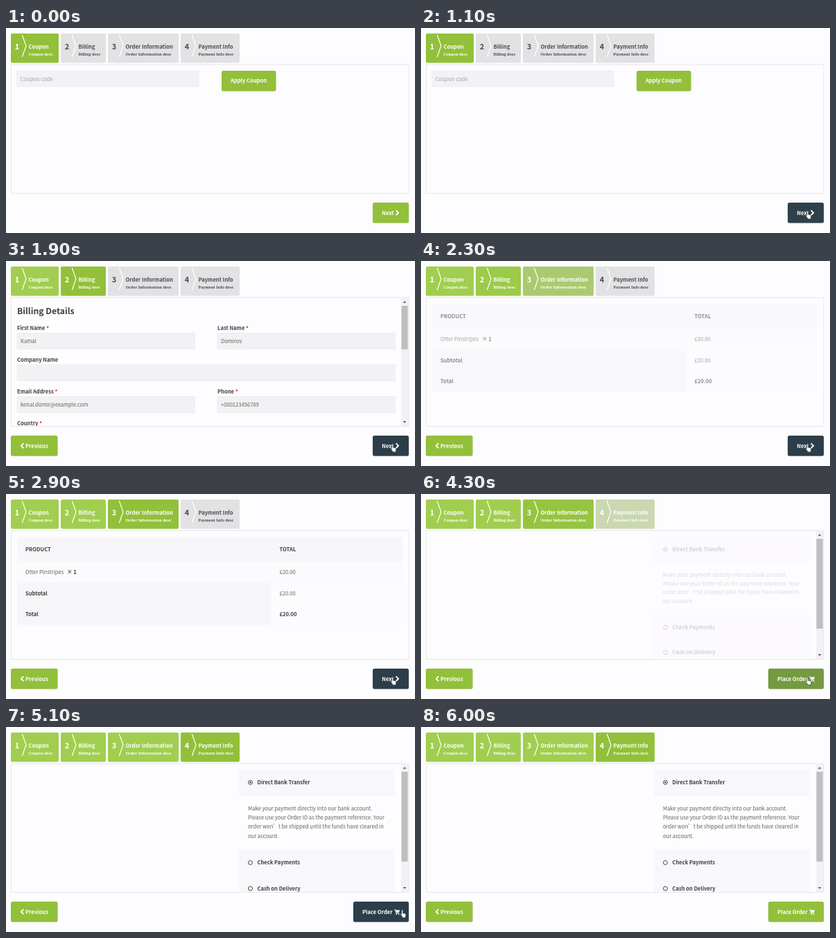
Write an HTML page that moves like this. It is 590 px wide and 297 px high and loops after 6.1 s.

```html
<!DOCTYPE html>
<html lang="en">
<head>
<meta charset="utf-8">
<title>Checkout steps</title>
<style>
  html, body { margin: 0; width: 100%; height: 100%; overflow: hidden; background: #fdfcfe; }
  svg { display: block; width: 590px; height: 297px; }
  text { font: 400 7.6px "Noto Sans CJK SC", "Noto Sans CJK JP", "Noto Sans", sans-serif; fill: #626262; white-space: pre; }
  .b { font-weight: 700; fill: #3f3f42; }
  .w { font-weight: 700; fill: #fff; }
  .h { font-size: 12.2px; }
  .num { font-size: 11px; font-weight: 700; }
  .title { font-weight: 700; }
  .desc { font: 700 5.5px "Noto Serif", serif; }
  .hint { fill: #a5a5a7; }
  .req { fill: #e2211c; }
</style>
</head>
<body>
<svg id="stage" viewBox="0 0 590 297"></svg>
<script>
const LOOP = 6100, TICK = 100;
const GREEN = [146, 192, 58], DONE = [161, 206, 80], GRAY = [226, 225, 227], DARK = [44, 62, 74];
const rgb = c => `rgb(${c.map(Math.round)})`;
const mix = (a, b, p) => a.map((v, i) => v + (b[i] - v) * p);

const text = (x, y, s, cls = '', extra = '') => `<text x="${x}" y="${y}" class="${cls}" ${extra}>${s}</text>`;
const rect = (x, y, w, h, fill, extra = '') => `<rect x="${x}" y="${y}" width="${w}" height="${h}" fill="${fill}" ${extra}/>`;
const group = (id, body, extra = '') => `<g id="${id}" ${extra}>${body}</g>`;
const stroke = (d, color, width) => `<path d="${d}" fill="none" stroke="${color}" stroke-width="${width}"/>`;

const button = (id, x, y, w, body) =>
  group(id, rect(x, y, w, 29.5, rgb(GREEN), 'rx="2.5" stroke="#000" stroke-opacity=".08" stroke-width=".6"') + body);

const tabs = [
  [7, 69, 'Coupon'], [79, 65, 'Billing'], [147, 102, 'Order Information'], [252, 85, 'Payment Info']
];
const tab = ([x, w, name], i) => group('tab' + i,
  rect(x, 8, w, 42.5, rgb(GRAY), 'rx="2"') +
  stroke(`M${x + 16.3} 10L${x + 22} 26L${x + 16.3} 42`, '#fff', 1.2) +
  text(x + 5.8, 31, i + 1, 'num') +
  text(x + 25.5, 29.7, name, 'title') +
  text(x + 25.5, 40.2, name + ' desc', 'desc'));

const scrollbar = thumb =>
  rect(570, 54, 11, 185, '#f1f0f2') + rect(570.5, 65, 9, thumb, '#bebdbf') +
  '<path d="M572.7 60.5h4.600l-2.300-2.500zM572.7 232h4.600l-2.300 2.500z" fill="#505050"/>';

const label = (x, y, s, required = true) =>
  text(x, y, s + (required ? ' <tspan class="req">*</tspan>' : ''), 'b');
const field = (x, y, w, h, s, cls = '') =>
  rect(x, y, w, h, '#f2f1f3', 'stroke="#ebeaec" stroke-width=".6"') + text(x + 5, y + 14.8, s, cls);

const couponPage =
  field(15.5, 62, 262.5, 23, 'Coupon code', 'hint') +
  button('apply', 311, 62, 78.5, text(350, 79, 'Apply Coupon', 'w', 'text-anchor="middle"'));

const billingPage =
  text(16, 76.5, 'Billing Details', 'b h') +
  label(16, 100.2, 'First Name') + field(16, 104.3, 256.5, 23.5, 'Kamal') +
  label(305, 100.2, 'Last Name') + field(305, 104.3, 256.5, 23.5, 'Domirov') +
  label(16, 146.2, 'Company Name', false) + field(16, 150.3, 545.5, 23.5, '') +
  label(16, 192.2, 'Email Address') + field(16, 196.3, 256.5, 23.5, 'kenal.domir@example.com') +
  label(305, 192.2, 'Phone') + field(305, 196.3, 256.5, 23.5, '+000123456789') +
  label(16, 238.2, 'Country');

const orderPage =
  rect(16, 62, 556, 36, '#f7f6f8') + rect(16, 98, 556, 31, '#fbfafc') +
  rect(16, 129, 366, 60.5, '#f6f5f7') + rect(382, 129, 190, 60.5, '#fcfbfd') +
  text(28, 82.5, 'PRODUCT', 'b') + text(394.5, 82.5, 'TOTAL', 'b') +
  text(28, 116.3, 'Otter Pinstripes') + text(88, 116.3, '× 1', 'b') + text(394.5, 116.3, '£20.00') +
  text(28, 146.8, 'Subtotal', 'b') + text(394.5, 146.8, '£20.00') +
  text(28, 177.3, 'Total', 'b') + text(394.5, 177.3, '£20.00', 'b');

// Rows spread slightly downward from the first heading as the page settles.
const spread = (y, k) => 80 + (y - 80) * k;
const option = (y, k, name, checked) => {
  const c = spread(y, k);
  return `<circle cx="352.5" cy="${c}" r="3" fill="none" stroke="#444" stroke-width="1"/>` +
    (checked ? `<circle cx="352.5" cy="${c}" r="1.2" fill="#444"/>` : '') +
    text(362.5, c + 2.8, name, 'b');
};
const paymentPage = k => {
  const edge = spread(100, k), second = spread(178, k);
  const lines = [
    'Make your payment directly into our bank account.',
    'Please use your Order ID as the payment reference. Your',
    'order won’t be shipped until the funds have cleared in',
    'our account.'
  ];
  return rect(336, 61.5, 225, edge - 61.5, '#f8f7fa') + rect(336, second, 225, 240 - second, '#f8f7fa') +
    option(80.3, k, 'Direct Bank Transfer', true) +
    lines.map((s, i) => text(349, spread(118 + i * 13.3, k) + 2.7, s)).join('') +
    option(196.5, k, 'Check Payments') + option(234, k, 'Cash on Delivery');
};

const cart = '<path d="M560 264.700h1.500l1.300 4.900h4.100" fill="none" stroke="#fff" stroke-width="1"/>' +
  '<path d="M561.900 265.200h6.100l-.9 3.400h-4.400z" fill="#fff"/>' +
  '<circle cx="563.2" cy="271.200" r=".9" fill="#fff"/><circle cx="566.600" cy="271.200" r=".9" fill="#fff"/>';
const hand = '<path d="M3 .6C3.900 .6 4.200 1.200 4.200 1.800V5.200L7.200 5.800Q8.600 6.200 8.400 7.400L7.800 10.400V11.800H3.200V10.600L.6 7.200C.1 6.400 1 5.700 1.700 6.300L2.100 6.900V1.800C2.100 1.100 2.400 .6 3 .6Z" fill="#fff" stroke="#333" stroke-width=".7"/>';

const stage = document.getElementById('stage');
stage.innerHTML =
  '<clipPath id="clip"><rect x="8" y="53.500" width="573" height="185.500"/></clipPath>' +
  rect(0, 0, 590, 297, '#fdfcfe') +
  tabs.map(tab).join('') +
  '<g clip-path="url(#clip)">' +
  [couponPage, billingPage, orderPage, ''].map((page, i) => group('page' + i, page)).join('') +
  group('billingBar', scrollbar(63)) + group('paymentBar', scrollbar(130)) + '</g>' +
  rect(7.5, 53, 573.5, 186.5, 'none', 'stroke="#e7e6e8" stroke-width="1"') +
  button('previous', 7, 253, 67.5, stroke('M25.300 264.200L21.900 267.700L25.300 271.200', '#fff', 1.9) + text(28, 270.6, 'Previous', 'w')) +
  button('next', 529, 253, 52, text(542.3, 270.6, 'Next', 'w') + stroke('M562.600 264.200L566 267.700L562.600 271.200', '#fff', 1.9)) +
  button('place', 501, 253, 80, text(514, 270.6, 'Place Order', 'w') + cart) +
  group('cursor', hand);

const el = id => document.getElementById(id);
const show = (id, on) => el(id).setAttribute('visibility', on ? 'visible' : 'hidden');
const paint = (id, color) => el(id).querySelector('rect').setAttribute('fill', rgb(color));

// CSS "ease" curve, solved by bisection.
function ease(u) {
  if (u <= 0) return 0;
  if (u >= 1) return 1;
  let lo = 0, hi = 1;
  for (let i = 0; i < 24; i++) {
    const s = (lo + hi) / 2, r = 1 - s;
    if (3 * r * r * s * .25 + 3 * r * s * s * .25 + s ** 3 < u) lo = s; else hi = s;
  }
  const s = lo, r = 1 - s;
  return 3 * r * r * s * .1 + 3 * r * s * s + s ** 3;
}
const during = (t, start, length) => ease((t - start) / length);

const clicks = [-1000, 1200, 2100, 4200];

function cursorAt(t) {
  if (t < 600 || t >= 5300) return null;
  if (t < 700) return [567, 264.5];
  if (t < 5000) return [554.5, 265];
  return [554.5 + (t - 4900) * .07, 264.5];
}

function update(t) {
  const step = clicks.filter(c => t > c).length - 1;
  const fade = during(t, clicks[step], 600);

  tabs.forEach((_, i) => {
    const start = during(t, clicks[i], 500);
    const done = i < 3 ? during(t, clicks[i + 1], 500) : 0;
    const node = el('tab' + i);
    paint('tab' + i, mix(mix(GRAY, GREEN, start), DONE, done));
    node.querySelectorAll('text').forEach(n => n.style.fill = i <= step ? '#fff' : '#4c4b4e');
    show('page' + i, i === step);
    el('page' + i).setAttribute('opacity', fade);
  });
  el('page3').innerHTML = paymentPage(.963 + .037 * fade);
  show('billingBar', step === 1);
  show('paymentBar', step === 3);

  show('previous', step > 0);
  show('next', step < 3);
  show('place', step === 3);
  paint('next', mix(GREEN, DARK, during(t, 700, 500)));
  paint('place', mix(GREEN, DARK, during(t, 4200, 500) - during(t, 5200, 500)));

  const at = cursorAt(t);
  show('cursor', at);
  if (at) el('cursor').setAttribute('transform', `translate(${at})`);
}

const begin = performance.now();
function frame() {
  const t = (performance.now() - begin) % LOOP;
  update(Math.floor(t / TICK) * TICK);
  requestAnimationFrame(frame);
}
frame();
</script>
</body>
</html>
```
